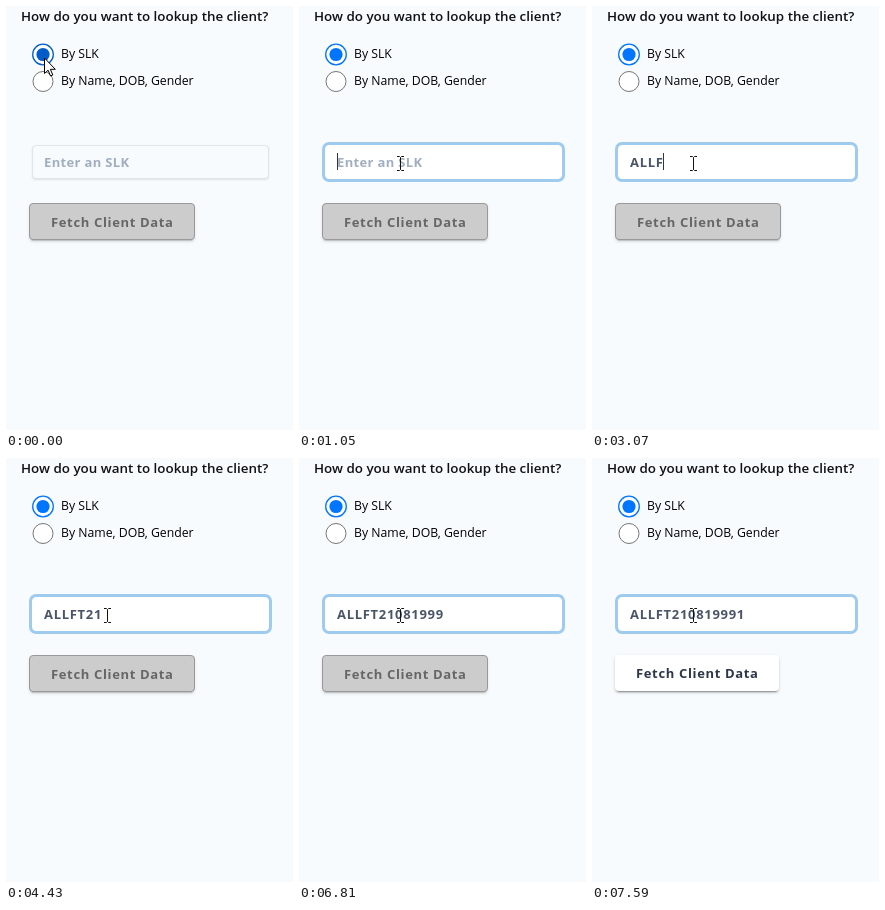
These frames come from a looping animation (287 by 424 pixels, 8000 ms). An HTML page:

```html
<!DOCTYPE html>
<html lang="en">
<head>
<meta charset="utf-8">
<title>Client lookup</title>
<style>
  html, body { margin: 0; width: 100%; height: 100%; overflow: hidden; background: #f7fbfe; }
  .stage { position: relative; width: 287px; height: 424px; overflow: hidden; }
  svg { position: absolute; inset: 0; }
  text { font-family: "Open Sans", "Noto Sans", sans-serif; white-space: pre; }
  .title { font-size: 13.4px; font-weight: 600; fill: #111; }
  .label { font-size: 12.25px; fill: #000; }
  .strong { font-size: 13px; font-weight: 700; letter-spacing: .65px; }
  #hint { fill: #a0aec0; letter-spacing: .35px; }
  #typed { fill: #4a5568; letter-spacing: .7px; }
  #caption { fill: #666; }

  .field, .button { position: absolute; box-sizing: border-box; border-radius: 4px; }
  .field {
    left: 26px; top: 139px; width: 237px; height: 34px;
    background: #f8fbfd; border: 1px solid #dfe5ea;
    box-shadow: 0 1px 2px rgba(0, 0, 0, .1);
  }
  .focused .field {
    background: #fff; border-color: #fff;
    box-shadow: 0 0 0 3px #9fcbee;
  }
  .button {
    left: 23px; top: 197px; width: 166px; height: 37px;
    background: #ccc; border: 1px solid #999;
    box-shadow: 0 3px 1px -2px rgba(0, 0, 0, .16), 0 2px 3px rgba(0, 0, 0, .1);
  }
  .ready .button {
    width: 164px; height: 36px; background: #fff; border: 0;
    box-shadow: 0 3px 1px -2px rgba(0, 0, 0, .25), 0 2px 2px rgba(0, 0, 0, .16), 0 1px 4px rgba(0, 0, 0, .08);
  }
  .ready #caption { fill: #2d3748; transform: translate(-1px, -1px); }

  .radio { fill: #fff; stroke: #767676; }
  .radio.on { stroke: #0075ff; stroke-width: 1.3; }
  .dot { fill: #0075ff; }
  .hover .radio.on { stroke: #005cc8; }
  .hover .dot { fill: #005cc8; }
</style>
</head>
<body>
<div class="stage" id="stage">
  <div class="field"></div>
  <div class="button"></div>
  <svg width="287" height="424">
    <text class="title" x="15" y="15">How do you want to lookup the client?</text>
    <circle class="radio on" cx="37" cy="48.5" r="10.3"/>
    <circle class="dot" cx="37" cy="48.5" r="6.6"/>
    <circle class="radio" cx="37" cy="75.5" r="10"/>
    <text class="label" x="55" y="52">By SLK</text>
    <text class="label" x="55" y="79">By Name, DOB, Gender</text>
    <text class="strong" id="hint" x="38" y="161">Enter an SLK</text>
    <text class="strong" id="typed" x="38" y="161"></text>
    <rect id="caret" x="38" y="147" width="1" height="17" fill="#2d3748"/>
    <text class="strong" id="caption" x="45" y="221">Fetch Client Data</text>
    <path id="arrow" d="M0 0V15.5L3.6 12.2 6 18 8.3 17 5.9 11.3H10.8Z" fill="#fff" stroke="#000" stroke-linejoin="round"/>
    <path id="beam" d="M98 150.5H100.5L101.5 151.5 102.5 150.5H105M101.5 151.5V163.5M98 164.5H100.5L101.5 163.5 102.5 164.5H105" fill="none" stroke="#111"/>
  </svg>
</div>
<script>
  const LOOP = 8000, LEFT = 38;
  const LEAVE = 510, ARRIVE = 640, FOCUS = 1050, READY = 6930;
  const CODE = "ALLFT210819991";
  const keyTimes = [2050, 2350, 2500, 3070, 3220, 3740, 3870,
                    4990, 5140, 5700, 5850, 6110, 6280, 6930];
  // Spans in which the blinking caret is hidden
  const blinks = [[0, FOCUS], [1590, 2050], [4430, 4860], [6810, 6930], [7590, LOOP]];

  const $ = id => document.getElementById(id);
  const stage = $("stage"), typed = $("typed"), caret = $("caret");
  const show = (el, on) => { el.style.visibility = on ? "visible" : "hidden"; };

  function draw() {
    const t = performance.now() % LOOP;
    const count = keyTimes.filter(k => t >= k).length;

    stage.classList.toggle("hover", t < LEAVE);
    stage.classList.toggle("focused", t >= FOCUS);
    stage.classList.toggle("ready", t >= READY);

    typed.textContent = CODE.slice(0, count);
    show($("hint"), count === 0);
    const width = count ? typed.getComputedTextLength() : 0;
    caret.setAttribute("x", Math.floor(LEFT + width));
    show(caret, !blinks.some(([from, to]) => t >= from && t < to));

    const [x, y] = t < LEAVE ? [38.5, 52] : [72.5, 106];
    $("arrow").setAttribute("transform", `translate(${x} ${y})`);
    show($("arrow"), t < ARRIVE);
    show($("beam"), t >= ARRIVE);

    requestAnimationFrame(draw);
  }
  draw();
</script>
</body>
</html>
```
